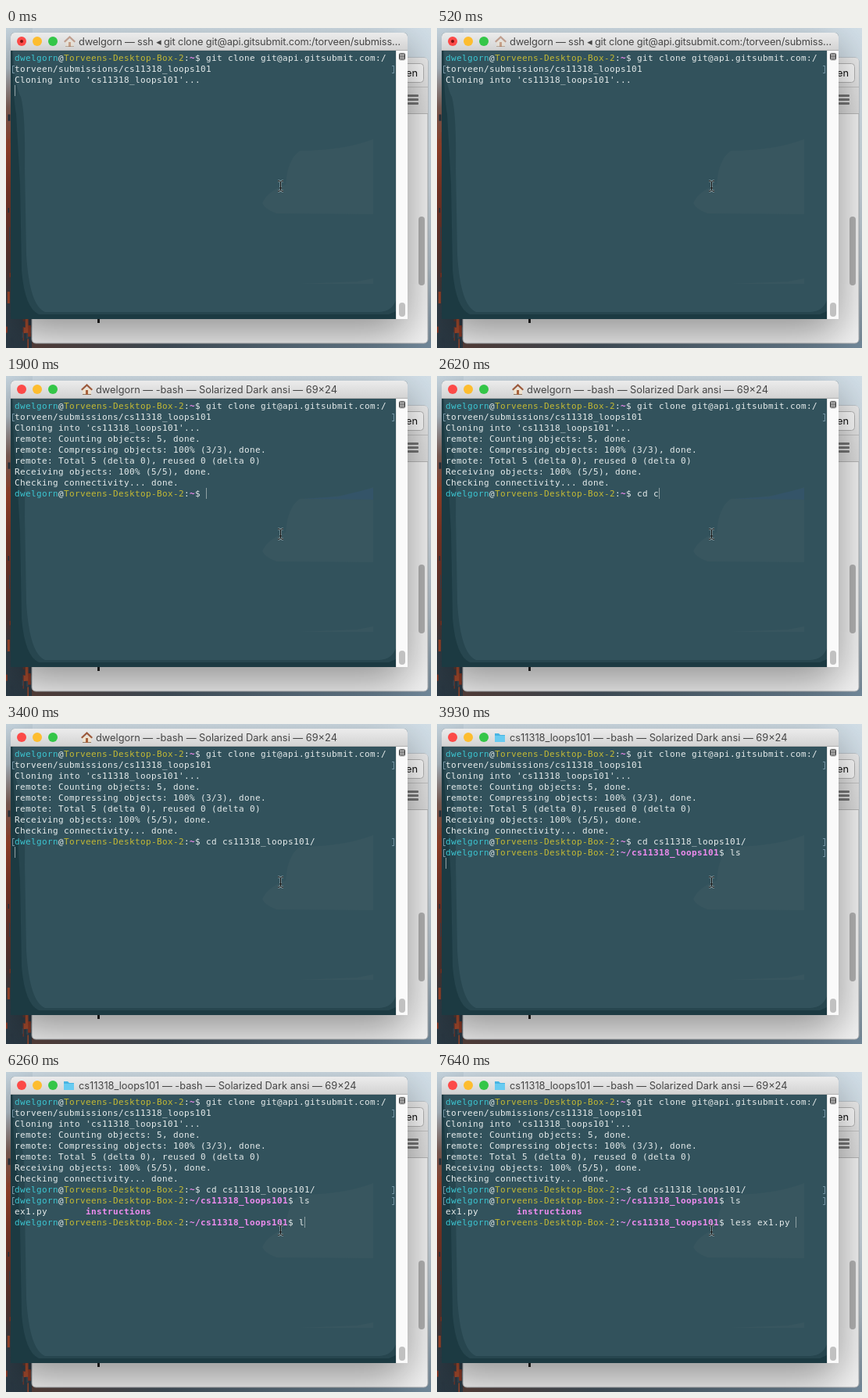
An HTML page with a canvas that plays this animation: 544x409 px, repeating every 8 s.

```html
<!DOCTYPE html>
<html lang="en">
<head>
<meta charset="utf-8">
<title>Terminal session</title>
<style>
  html, body { margin: 0; width: 100%; height: 100%; overflow: hidden; }
  canvas { display: block; }
</style>
</head>
<body>
<canvas id="stage" width="544" height="409"></canvas>
<script>
const ctx = document.getElementById('stage').getContext('2d');
const LOOP = 8000, CELL = 7, ROW = 14, LEFT = 11, TOP = 31;
const UI = 'Inter, "Liberation Sans", sans-serif';
const MONO = '"DejaVu Sans Mono", monospace';
const FG = '#e6ecec', CYAN = '#3cc6d2', YELLOW = '#c3b934', PINK = '#f08cf0';
const USER = 'dwelgorn', HOST = 'Torveens-Desktop-Box-2', REPO = 'cs11318_loops101';

// ---------- Session script ----------
const prompt = path => [[USER, CYAN], ['@', FG], [HOST, YELLOW], [':', FG], [path, PINK, true], ['$ ', FG]];
const plain = text => [[text, FG]];

// Each row appears at `at`; `keys` are [time, typed so far]; `enter` adds the line marks.
const rows = [
  { at: 0, runs: [...prompt('~'), ['git clone git@api.gitsubmit.com:/', FG]] },
  { at: 0, runs: plain(`torveen/submissions/${REPO}`), enter: 0 },
  { at: 0, runs: plain(`Cloning into '${REPO}'...`) },
  { at: 1840, runs: plain('remote: Counting objects: 5, done.') },
  { at: 1840, runs: plain('remote: Compressing objects: 100% (3/3), done.') },
  { at: 1840, runs: plain('remote: Total 5 (delta 0), reused 0 (delta 0)') },
  { at: 1900, runs: plain('Receiving objects: 100% (5/5), done.') },
  { at: 1900, runs: plain('Checking connectivity... done.') },
  { at: 1900, runs: prompt('~'), enter: 3400, keys: [
    [2260, 'c'], [2320, 'cd'], [2500, 'cd '], [2590, 'cd c'], [2680, 'cd cs'], [2860, `cd ${REPO}/`]] },
  { at: 3460, runs: prompt(`~/${REPO}`), enter: 3870, keys: [[3760, 'l'], [3820, 'ls']] },
  { at: 3990, runs: [['ex1.py       ', FG], ['instructions', PINK, true]] },
  { at: 4050, runs: prompt(`~/${REPO}`), keys: [
    [6260, 'l'], [6380, 'le'], [6680, 'les'], [6800, 'less'],
    [7100, 'less '], [7160, 'less e'], [7340, 'less ex'], [7640, 'less ex1.py ']] },
];
const cursorOff = [[520, 1000], [1480, 1840], [4470, 5010], [5490, 5960]];

// A truncated title is tracked slightly tighter.
const titles = [
  { at: 0, icon: 'home', x: 74, tracking: '-0.15px', text: `${USER} — ssh ◂ git clone git@api.gitsubmit.com:/torveen/submiss…` },
  { at: 1900, icon: 'home', x: 96, tracking: '0px', text: `${USER} — -bash — Solarized Dark ansi — 69×24` },
  { at: 3460, icon: 'folder', x: 74, tracking: '0px', text: `${REPO} — -bash — Solarized Dark ansi — 69×24` },
];

// ---------- Drawing helpers ----------
function rect(x, y, w, h, fill) {
  ctx.fillStyle = fill;
  ctx.fillRect(x, y, w, h);
}

function round(x, y, w, h, radius, fill, stroke) {
  ctx.beginPath();
  ctx.roundRect(x, y, w, h, radius);
  if (fill) { ctx.fillStyle = fill; ctx.fill(); }
  if (stroke) { ctx.strokeStyle = stroke; ctx.stroke(); }
}

function shape(path, fill) {
  ctx.fillStyle = fill;
  ctx.fill(new Path2D(path));
}

function circle(x, y, r, fill) {
  ctx.beginPath();
  ctx.arc(x, y, r, 0, Math.PI * 2);
  ctx.fillStyle = fill;
  ctx.fill();
}

function gradient(x0, y0, x1, y1, ...colors) {
  const g = ctx.createLinearGradient(x0, y0, x1, y1);
  colors.forEach((c, i) => g.addColorStop(i / (colors.length - 1), c));
  return g;
}

function label(text, x, y, fill, align = 'left') {
  ctx.font = `12.8px ${UI}`;
  ctx.textAlign = align;
  ctx.fillStyle = fill;
  ctx.fillText(text, x, y);
}

// ---------- Scene ----------
function drawDesktop() {
  rect(0, 0, 544, 409, gradient(0, 0, 0, 409, '#d3e0e9', '#d0dce4', '#c5d0d8', '#a9b6c0', '#6f8291'));
  rect(0, 0, 34, 409, gradient(0, 0, 0, 409,
    '#c9d8e2', '#bccad4', '#8d6a60', '#a84a2f', '#8a3d2b', '#743a2e', '#5a3b36', '#34424d', '#2a3944'));
  rect(33, 400, 511, 9, gradient(33, 0, 544, 0, '#57403b', '#43515c', '#5b6f7e', '#71889a'));

  // Rock streaks along the left edge and corner
  const colors = ['#8e3a26', '#2b3945', '#5b3a34', '#a84c2e', '#3c4c57'];
  let seed = 7;
  const random = () => (seed = seed * 16807 % 2147483647) / 2147483647;
  for (let i = 0; i < 70; i++) {
    const x = random() * 34, y = 110 + random() * 295;
    rect(x, y, 1 + random() * 3, 5 + random() * 14, colors[i % colors.length]);
  }
}

function drawBrowser() {
  round(33, 38, 507, 365, 5, '#f4f4f4', '#a9adb0');
  shape('M38 38 H535 Q540 38 540 43 V109 H33 V43 Q33 38 38 38Z', gradient(0, 38, 0, 109, '#ececec', '#dedede'));
  rect(33, 75, 507, 1, '#c4c4c4');
  rect(33, 109, 507, 1, '#b8b8b8');
  round(480.5, 45.5, 54, 24, 4, '#fafafa', '#b5b5b5');
  label('een', 527, 62, '#111', 'right');
  for (const y of [85, 90, 95]) round(514, y, 14, 3, 1, '#777');
  round(528, 241, 8, 88, 4, '#b4b4b4');
  rect(117, 368, 3, 9, '#222');
}

function drawWindow() {
  ctx.save();
  ctx.shadowColor = 'rgba(0,0,0,.42)';
  ctx.shadowBlur = 56;
  ctx.shadowOffsetY = 18;
  round(6, 6, 508, 366, [5, 5, 0, 0], '#32525c');
  ctx.restore();
  round(6, 6, 508, 22, [5, 5, 0, 0], gradient(0, 6, 0, 28, '#ececec', '#d3d3d3'));
  rect(6, 28, 508, 1, '#b2b2b2');

  rect(6, 29, 493, 343, '#32525c');
  shape('M6 29 H9 Q11 75 19 88 Q25 110 24 180 L26 290 Q30 355 50 363 H478 Q494 362 499 348 V372 H6Z', '#27464f');
  shape('M6 29 H8 Q9 90 13 110 L18 200 L20 310 Q24 358 42 366 H490 L499 362 V372 H6Z', '#1c3a42');
  shape('M328 224 Q334 209 358 200 Q360 168 376 157 Q435 156 470 142 V238 L346 237 Q332 232 328 224Z', '#38565f');
  shape('M375 327 L450 324 L470 320 V327Z', '#38565f');

  rect(499, 29, 15, 343, '#fafafa');
  rect(499, 29, 1, 343, '#e2e2e2');
  round(503.5, 32.5, 7, 8, 1, '#f4f4f4', '#333');
  for (const y of [34, 36, 38]) rect(504, y, 6, 1, '#333');
  round(503, 351, 8, 18, 4, '#c1c1c1');
}

function drawIcon(kind, x, faded) {
  ctx.globalAlpha = faded ? 0.5 : 1;
  if (kind === 'folder') {
    shape(`M${x} 12 h5 l2 2 h6 v9 h-13Z`, '#48b4e2');
    rect(x, 15, 13, 8, '#68cbf1');
  } else {
    rect(x + 2, 16, 11, 8, '#eee2cf');
    shape(`M${x} 17 l7.5 -7 l7.5 7 l-1.5 1.5 l-6 -5.5 l-6 5.5Z`, '#9c5a3c');
    rect(x + 2, 23, 11, 1, '#8d7660');
    rect(x + 6, 18, 3, 6, '#a8623d');
  }
  ctx.globalAlpha = 1;
}

function drawTitle(t) {
  const title = titles.findLast(item => item.at <= t);
  const busy = title === titles[0];
  circle(20, 17, 6, '#fc4a48');
  circle(40, 17, 6, '#fdbd2f');
  circle(60, 17, 6, '#34c648');
  if (busy) circle(20, 17, 2, '#7d1210');
  drawIcon(title.icon, title.x, busy);
  ctx.letterSpacing = title.tracking;
  label(title.text, title.x + 19, 22, '#454545');
  ctx.letterSpacing = '0px';
}

function drawMarks(y) {
  rect(8, y + 3, 1, 10, '#7393a2');
  rect(8, y + 3, 3, 1, '#7393a2');
  rect(8, y + 12, 3, 1, '#7393a2');
  rect(496, y + 3, 1, 10, '#7393a2');
  rect(494, y + 3, 3, 1, '#7393a2');
  rect(494, y + 12, 3, 1, '#7393a2');
}

function drawRuns(runs, y) {
  let col = 0;
  ctx.textAlign = 'left';
  for (const [text, color, bold] of runs) {
    ctx.font = `${bold ? 'bold ' : ''}11px ${MONO}`;
    ctx.fillStyle = color;
    for (const char of text) ctx.fillText(char, LEFT + CELL * col++, y + 11);
  }
  return col;
}

function drawTerminal(t) {
  if (t >= 1900 && t < 3400) shape('M380 157 L425 154 L470 143 V158Z', '#345468');
  let cursorRow = 0, cursorCol = 0;
  rows.filter(row => row.at <= t).forEach((row, i) => {
    const y = TOP + ROW * i;
    const typed = row.keys?.findLast(([time]) => time <= t)?.[1] ?? '';
    const col = drawRuns([...row.runs, [typed, FG]], y);
    const entered = t >= row.enter;
    if (entered) drawMarks(y);
    const editing = row.keys && !entered;
    cursorRow = editing ? i : i + 1;
    cursorCol = editing ? col : 0;
  });
  if (!cursorOff.some(([from, to]) => t >= from && t < to)) {
    rect(LEFT + CELL * cursorCol, TOP + ROW * cursorRow, 1, ROW, '#8fa0a3');
  }
}

function drawPointer() {
  const beam = new Path2D('M348 195.5 H350 L351.5 197 L353 195.5 H355 M351.5 197 V207 M348 208.5 H350 L351.5 207 L353 208.5 H355 M350 204.5 H353');
  for (const [width, color] of [[2.4, 'rgba(225,232,232,.5)'], [1, '#111']]) {
    ctx.lineWidth = width;
    ctx.strokeStyle = color;
    ctx.stroke(beam);
  }
  ctx.lineWidth = 1;
}

function frame() {
  const t = performance.now() % LOOP;
  drawDesktop();
  drawBrowser();
  drawWindow();
  drawTitle(t);
  drawTerminal(t);
  drawPointer();
  requestAnimationFrame(frame);
}
frame();
</script>
</body>
</html>
```
